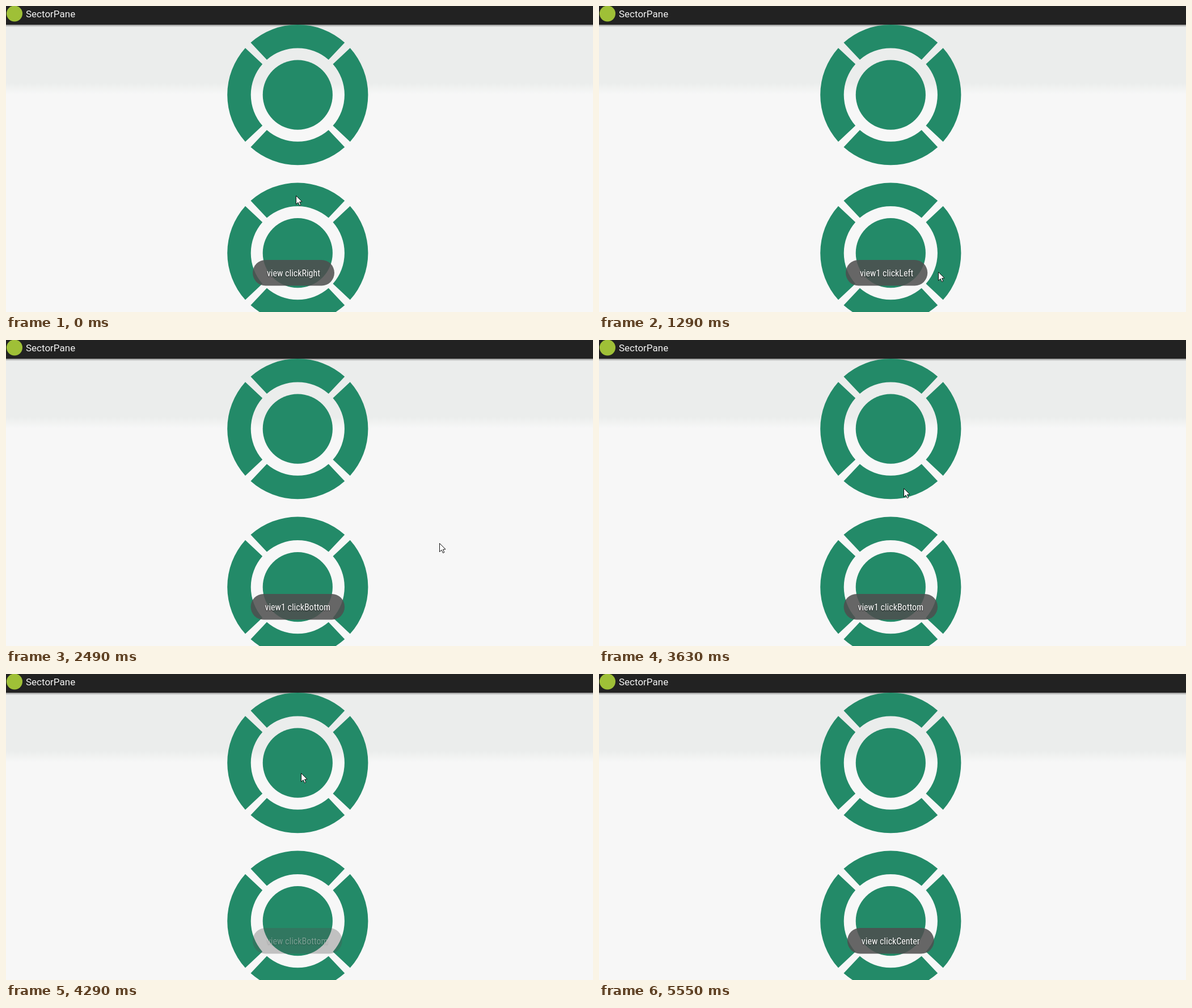
Write an HTML page with a canvas that moves like this. It is 1035 px wide and 541 px high and loops after 6420 ms.

```html
<!DOCTYPE html>
<html lang="en">
<head>
<meta charset="utf-8">
<title>SectorPane</title>
<style>
  html, body { margin: 0; width: 100%; height: 100%; overflow: hidden; background: #f7f7f7; }
  canvas { display: block; }
</style>
</head>
<body>
<canvas id="stage" width="1035" height="541"></canvas>
<script>
const canvas = document.getElementById('stage');
const ctx = canvas.getContext('2d');
const { width: WIDTH, height: HEIGHT } = canvas;
const LOOP = 6420;
const GREEN = '#238a68', PRESSED = '#b03060';
const CENTER_X = 514.3;
const WHEELS = [{ name: 'view', y: 157.1 }, { name: 'view1', y: 436.7 }];
const SIDES = ['Right', 'Bottom', 'Left', 'Top'];
const TOAST = { delay: 470, life: 1870, fade: 110, settle: 380, openLeft: 435, padding: 25 };
const TOAST_FONT = 'condensed 16px "Roboto Condensed", Roboto, sans-serif';

// The pointer rests at each stop from `arrive` to `leave`; a stop with a part is a click.
const stops = [
  { x: 610, y: 160, arrive: -900, leave: -480, press: -600, wheel: 0, part: 'Right' },
  { x: 511, y: 335, arrive: 0, leave: 120, press: 120, wheel: 1, part: 'Top' },
  { x: 424, y: 403, arrive: 360, leave: 630, press: 510, wheel: 1, part: 'Left' },
  { x: 598, y: 470, arrive: 1020, leave: 1290, press: 1170, wheel: 1, part: 'Right' },
  { x: 560, y: 518, arrive: 1530, leave: 1680, press: 1680, wheel: 1, part: 'Bottom' },
  { x: 802, y: 430, arrive: 1980, leave: 1980 },
  { x: 764, y: 359, arrive: 2490, leave: 2490 },
  { x: 729, y: 343, arrive: 3240, leave: 3240 },
  { x: 537, y: 262, arrive: 3630, leave: 3780, press: 3780, wheel: 0, part: 'Bottom' },
  { x: 520, y: 175, arrive: 4290, leave: 4590, press: 4440, hold: 300, wheel: 0, part: 'Center' },
  { x: 884, y: 305, arrive: 5010, leave: 5010 },
  { x: 1000, y: 560, arrive: 5550, leave: LOOP }
];
const clicks = stops.filter(stop => stop.part);

const clamp = value => Math.min(1, Math.max(0, value));
const ease = value => value * value * (3 - 2 * value);
const mix = (from, to, amount) => from + (to - from) * amount;
const rad = degrees => degrees * Math.PI / 180;

function disc(x, y, radius, color) {
  ctx.fillStyle = color;
  ctx.beginPath();
  ctx.arc(x, y, radius, 0, 2 * Math.PI);
  ctx.fill();
}

function fadeBand(top, bottom, from, to) {
  const fade = ctx.createLinearGradient(0, top, 0, bottom);
  fade.addColorStop(0, from);
  fade.addColorStop(1, to);
  return fade;
}

function drawBackground() {
  ctx.fillStyle = fadeBand(136, 156, '#ebedec', '#f7f7f7');
  ctx.fillRect(0, 0, WIDTH, HEIGHT);
}

function drawBar() {
  ctx.fillStyle = '#222';
  ctx.fillRect(0, 0, WIDTH, 33);
  ctx.fillStyle = fadeBand(33, 37, 'rgba(0, 0, 0, 0.4)', 'rgba(0, 0, 0, 0)');
  ctx.fillRect(0, 33, WIDTH, 4);
  disc(15, 13.5, 14, '#9fc037');
  ctx.fillStyle = '#f3f3f3';
  ctx.font = '17px Roboto, sans-serif';
  ctx.fillText('SectorPane', 35, 19.5);
}

function drawWheel({ y }, pressedPart) {
  const color = part => part === pressedPart ? PRESSED : GREEN;
  const outer = rad(41.9), inner = rad(41.2);
  SIDES.forEach((side, turn) => {
    const middle = turn * Math.PI / 2;
    ctx.fillStyle = color(side);
    ctx.beginPath();
    ctx.arc(CENTER_X, y, 124.1, middle - outer, middle + outer);
    ctx.arc(CENTER_X, y, 82.6, middle + inner, middle - inner, true);
    ctx.fill();
  });
  disc(CENTER_X, y, 61.6, color('Center'));
}

function toastOpacity(click, previous, age) {
  const fadeOut = clamp(1 - (age - TOAST.life) / TOAST.fade);
  const replaces = !previous || click.press - previous.press < TOAST.life;
  return replaces ? fadeOut : Math.min(fadeOut, clamp(age / TOAST.fade));
}

// A toast opens at a fixed left edge, then settles in the centre.
function drawToast(time) {
  const index = clicks.findLastIndex(click => click.press + TOAST.delay <= time);
  const click = clicks[index];
  const age = time - click.press - TOAST.delay;
  const text = `${WHEELS[click.wheel].name} click${click.part}`;
  ctx.save();
  ctx.globalAlpha = toastOpacity(click, clicks[index - 1], age);
  ctx.font = TOAST_FONT;
  const width = ctx.measureText(text).width + 2 * TOAST.padding;
  const centered = CENTER_X - width / 2;
  const left = age < TOAST.settle ? Math.min(centered, TOAST.openLeft) : centered;
  ctx.fillStyle = 'rgba(79, 79, 79, 0.86)';
  ctx.beginPath();
  ctx.roundRect(left, 449, width, 45.5, 22.5);
  ctx.fill();
  ctx.shadowColor = 'rgba(0, 0, 0, 0.7)';
  ctx.shadowBlur = 2;
  ctx.shadowOffsetY = 1;
  ctx.fillStyle = '#fff';
  ctx.fillText(text, left + TOAST.padding, 478);
  ctx.restore();
}

function pointerAt(time) {
  const index = stops.findLastIndex(stop => stop.arrive <= time);
  const from = stops[index], to = stops[index + 1] || from;
  const amount = ease(clamp((time - from.leave) / (to.arrive - from.leave)));
  return [mix(from.x, to.x, amount), mix(from.y, to.y, amount)];
}

function drawPointer(time) {
  const [x, y] = pointerAt(time);
  ctx.save();
  ctx.translate(x + 0.5, y + 0.5);
  const outline = new Path2D('M0 0V15L3.5 11.7L6 17L8.3 16L6 10.8L10.5 10.5Z');
  ctx.fillStyle = '#fff';
  ctx.fill(outline);
  ctx.strokeStyle = '#111';
  ctx.stroke(outline);
  ctx.restore();
}

function draw(time) {
  const pressed = clicks.find(({ press, hold = 120 }) => time >= press && time < press + hold);
  drawBackground();
  drawBar();
  WHEELS.forEach((wheel, index) => drawWheel(wheel, pressed?.wheel === index ? pressed.part : null));
  drawToast(time);
  drawPointer(time);
}

const begin = performance.now();
function tick() {
  draw((performance.now() - begin) % LOOP);
  requestAnimationFrame(tick);
}
tick();
</script>
</body>
</html>
```
